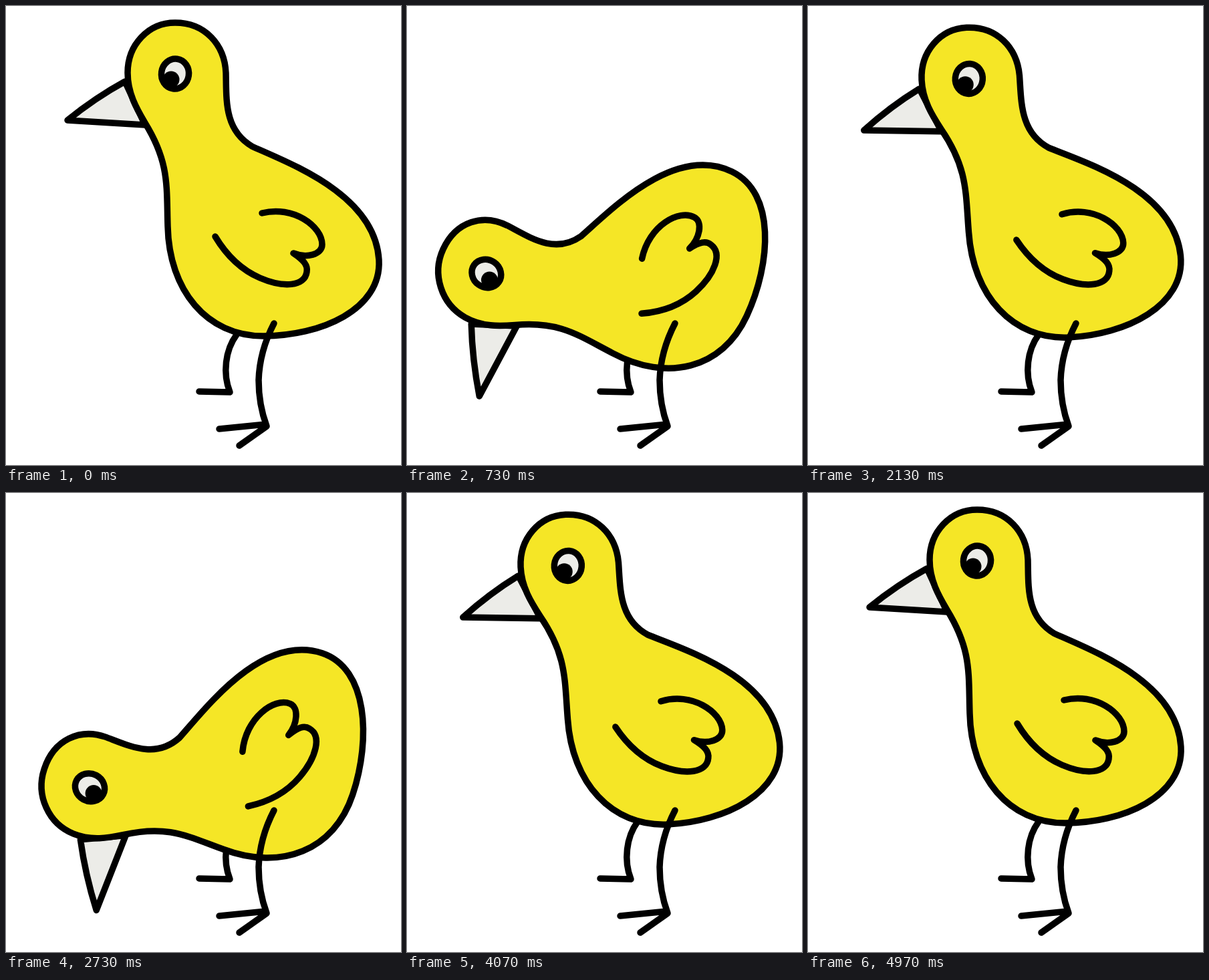
Write an HTML page with a canvas that moves like this. It is 591 px wide and 687 px high and loops after 5.73 s.

```html
<!DOCTYPE html>
<html lang="en">
<head>
<meta charset="utf-8">
<title>Pecking chick</title>
<style>
html, body { margin: 0; width: 100%; height: 100%; overflow: hidden; background: #fff; }
canvas { display: block; }
</style>
</head>
<body>
<canvas id="stage" width="591" height="687"></canvas>
<script>
const ctx = document.getElementById('stage').getContext('2d');
const LOOP = 5730, STEP = 39, PECKS = [200, 2130, 4070];
const YELLOW = '#f5e626', WHITE = '#ecece8', BLACK = '#000';
const PIVOT = { x: 430, y: 367 }, BEND = 70, BOUNCE = 14;
const SQUASH = { x: 230, y: 480, amount: 0.05 };

// The standing chick; every part but the legs bends with it.
const BODY = `M253 25 C298 25 327 58 329 100 C330 140 326 185 368 210
  C425 236 552 282 558 380 C562 455 470 494 385 494 C300 494 244 425 242 330
  C240 270 245 235 208 175 C195 153 182 130 182 100 C182 58 213 25 253 25 Z`;
const WING = `M383 310 C430 298 473 330 473 357 C473 372 450 378 430 370
  C445 380 452 388 450 398 C447 420 415 422 380 407 C350 394 328 370 313 345`;
const BEAK = 'M178 113 Q134 137 92 171 L208 178 Z';
const FAR_LEG = 'M345 492 C328 515 324 550 335 578 L289 577';
const NEAR_LEG = 'M401 475 C388 500 379 530 378 560 C378 590 383 610 390 629 M319 633 L389 626 M349 658 L390 629';

const rad = deg => deg * Math.PI / 180;
const wave = x => Math.sin(x * Math.PI / 2) ** 2;

// Turn about the pivot, then flatten sideways and stretch upright as the bend grows.
function place(x, y, angle) {
  const c = Math.cos(rad(angle)), s = Math.sin(rad(angle));
  const dx = x - PIVOT.x, dy = y - PIVOT.y;
  const k = SQUASH.amount * Math.sin(angle / BEND * Math.PI / 2);
  const tx = PIVOT.x + dx * c + dy * s, ty = PIVOT.y - dx * s + dy * c;
  return [tx - k * (tx - SQUASH.x), ty + k * (ty - SQUASH.y)];
}

const bent = (path, angle) =>
  path.replace(/(\d+) (\d+)/g, (_, x, y) => place(+x, +y, angle).join(' '));

// Eight steps down, eight for a second small peck, eight back up.
function angleAt(t) {
  const start = PECKS.filter(p => p <= t).pop();
  if (start === undefined) return 0;
  const n = Math.floor((t - start) / STEP) + 1;
  if (n <= 8) return BEND * wave(n / 8);
  if (n <= 16) return BEND - BOUNCE * wave((n - 8) / 4);
  return n < 24 ? BEND * wave((24 - n) / 8) : 0;
}

function ink(data, fill) {
  const path = new Path2D(data);
  if (fill) {
    ctx.fillStyle = fill;
    ctx.fill(path);
  }
  ctx.stroke(path);
}

function drawEye(angle) {
  ctx.beginPath();
  ctx.ellipse(...place(253, 101.5, angle), 20.5, 22.5, rad(8 - angle), 0, 7);
  ctx.fillStyle = WHITE;
  ctx.fill();
  ctx.stroke();
  ctx.beginPath();
  ctx.arc(...place(247, 110, angle), 12.5, 0, 7);
  ctx.fillStyle = BLACK;
  ctx.fill();
}

function draw(angle) {
  ctx.fillStyle = '#fff';
  ctx.fillRect(0, 0, 591, 687);
  ctx.strokeStyle = BLACK;
  ctx.lineWidth = 9.5;
  ctx.lineCap = ctx.lineJoin = 'round';

  ink(FAR_LEG);
  ink(bent(BEAK, angle), WHITE);
  ink(bent(BODY, angle), YELLOW);
  ink(bent(WING, angle));
  drawEye(angle);
  ink(NEAR_LEG);
}

const begin = performance.now();
function frame() {
  draw(angleAt((performance.now() - begin) % LOOP));
  requestAnimationFrame(frame);
}
frame();
</script>
</body>
</html>
```
